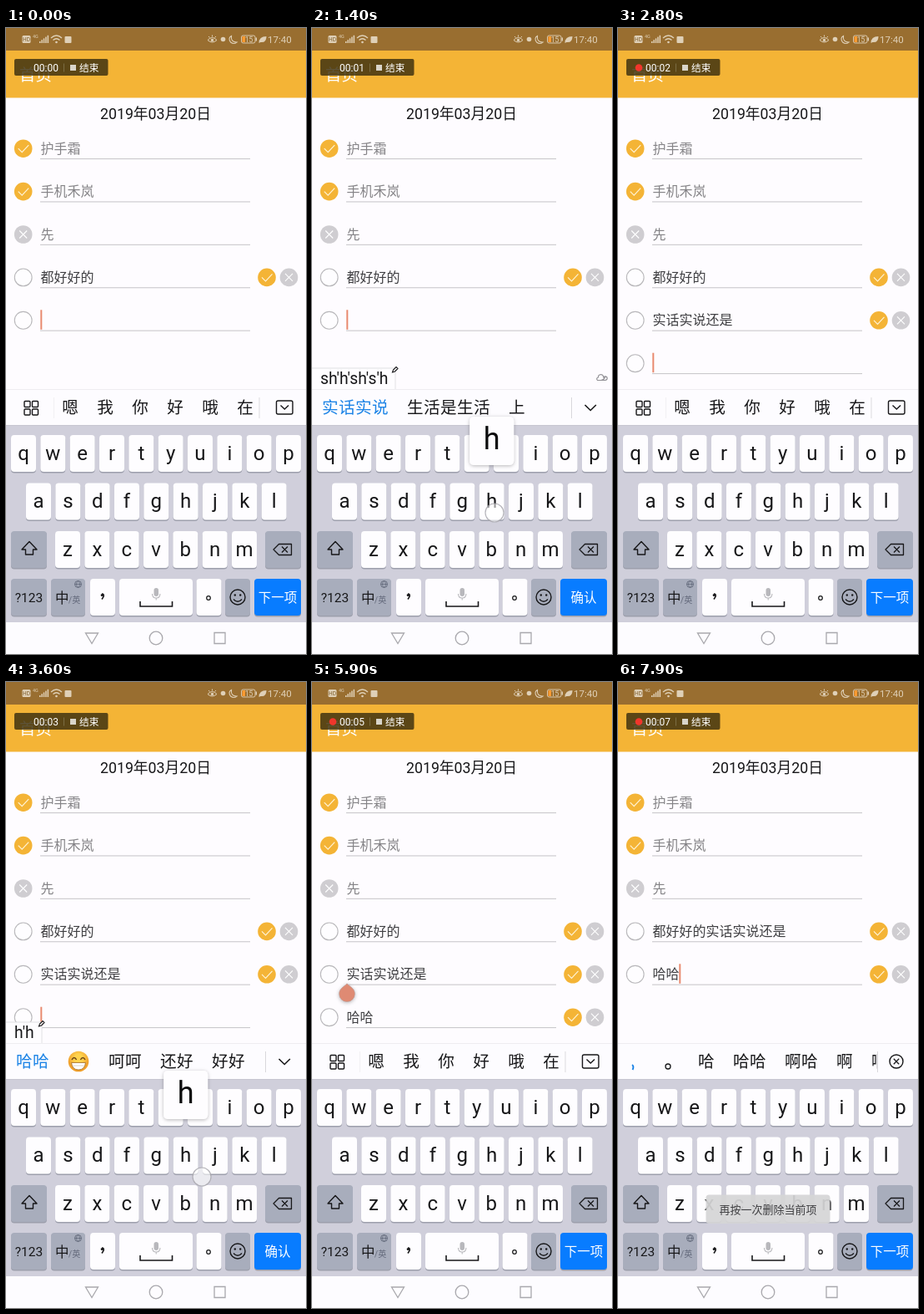
Write an HTML page that moves like this. It is 360 px wide and 749 px high and loops after 8 s.

```html
<!DOCTYPE html>
<html lang="zh-CN">
<head>
<meta charset="utf-8">
<title>待办输入</title>
<style>
html, body { margin: 0; width: 100%; height: 100%; overflow: hidden; background: #fefcff; }
svg { display: block; width: 360px; height: 749px; }
text { font-family: Roboto, "Noto Sans CJK SC", "Noto Sans CJK", sans-serif; white-space: pre; }
</style>
</head>
<body>
<svg id="stage" viewBox="0 0 360 749">
  <defs>
    <clipPath id="bar"><rect y="432" width="310.5" height="43"/></clipPath>
    <filter id="soft" x="-30%" y="-30%" width="160%" height="160%">
      <feDropShadow dx="0" dy="1" stdDeviation="2" flood-opacity=".28"/>
    </filter>
    <radialGradient id="face" cy=".35"><stop offset=".4" stop-color="#ffd34f"/><stop offset="1" stop-color="#f0a02c"/></radialGradient>
  </defs>
  <g id="header"></g>
  <g id="list"></g>
  <g id="candidates"></g>
  <g id="keyboard"></g>
  <g id="overlay"></g>
</svg>
<script>
const LOOP = 8000;
const ORANGE = '#f4b436', INK = '#171719', CORAL = '#e98b70';
const $ = id => document.getElementById(id);

// SVG string helpers
const rect = (x, y, w, h, fill, r = 0, more = '') =>
  `<rect x="${x}" y="${y}" width="${w}" height="${h}" rx="${r}" fill="${fill}" ${more}/>`;
const circle = (x, y, r, fill, more = '') => `<circle cx="${x}" cy="${y}" r="${r}" fill="${fill}" ${more}/>`;
const line = (d, color, w = 1, more = '') =>
  `<path d="${d}" fill="none" stroke="${color}" stroke-width="${w}" ${more}/>`;
const text = (x, y, s, size, fill = INK, anchor = 'start', more = '') =>
  `<text x="${x}" y="${y}" font-size="${size}" fill="${fill}" text-anchor="${anchor}" ${more}>${s}</text>`;
const mid = (x, y, s, size, fill) => text(x, y, s, size, fill, 'middle');

const cache = {};
function put(id, html) {
  if (cache[id] !== html) $(id).innerHTML = cache[id] = html;
}

const pen = document.createElement('canvas').getContext('2d');
function widthOf(s, size) {
  pen.font = `${size}px Roboto, sans-serif`;
  return pen.measureText(s).width;
}

// Keyboard layout
const keys = {};
function addRow(letters, x0, y) {
  [...letters].forEach((c, i) => keys[c] = { x: x0 + i * 35.33 - 15, y, w: 30, h: 44.5 });
}
addRow('qwertyuiop', 21, 487);
addRow('asdfghjkl', 39, 544.5);
addRow('zxcvbnm', 74, 602);
Object.assign(keys, {
  shift: { x: 6, y: 602, w: 43, h: 44.5, dark: 1 },
  del: { x: 311, y: 602, w: 43, h: 44.5, dark: 1 },
  num: { x: 6, y: 659, w: 43, h: 44.5, dark: 1 },
  lang: { x: 54, y: 659, w: 41, h: 44.5, dark: 1 },
  comma: { x: 101, y: 659, w: 30, h: 44.5 },
  space: { x: 136, y: 659, w: 88, h: 44.5 },
  stop: { x: 228.5, y: 659, w: 30, h: 44.5 },
  smile: { x: 263, y: 659, w: 30, h: 44.5, dark: 1 },
  enter: { x: 298, y: 659, w: 56, h: 44.5, blue: 1 }
});

function keyboard(composing, pressed) {
  let s = rect(0, 475, 360, 236, '#d0cfdb') + rect(0, 475, 360, 1, '#c6c5d0') + rect(0, 711, 360, 38, '#fdfcff');
  for (const name in keys) {
    const k = keys[name];
    let fill = k.blue ? '#087cff' : k.dark ? '#a8adbc' : '#fefdff';
    if (pressed.includes(name)) fill = k.blue ? '#0668d8' : k.dark ? '#969cac' : '#b3bac9';
    s += rect(k.x, k.y + 1, k.w, k.h, '#9d9fac', 4) + rect(k.x, k.y, k.w, k.h - .5, fill, 4);
    if (name.length === 1) s += mid(k.x + 15, k.y + 29.5, name, 24, INK);
  }
  s += line('M28 614.5l9 9.5h-4.5v6h-9v-6H19z', INK, 1.4, 'stroke-linejoin="round"');
  s += line('M321 624l6.5-6.5h15v13h-15zM331 620.5l7 7m0-7l-7 7', INK, 1.3, 'stroke-linejoin="round"');
  s += mid(27.5, 687, '?123', 15.5, INK);
  s += text(59, 687.5, '中', 16.5) + text(75, 688, '/英', 10, '#62687a');
  s += circle(86.5, 665.5, 4, 'none', 'stroke="#596072" stroke-width=".8"');
  s += line('M82.5 665.5h8M86.5 661.5q-4 4 0 8q4-4 0-8', '#596072', .7);
  s += line('M115 677q3 0 2 3.5l-2 3', INK, 1.6) + circle(115.3, 678.5, 1.6, INK);
  s += rect(177.5, 670, 5.5, 10, '#b8b8bc', 2.75) + line('M175.5 677q0 5 4.7 5t4.7-5M180.2 682v2.5', '#b8b8bc', 1.1);
  s += line('M161 686v6h38.500v-6', INK, 1.6);
  s += circle(243, 682, 2.3, 'none', `stroke="${INK}" stroke-width="1.2"`);
  s += circle(278, 681, 9, 'none', `stroke="${INK}" stroke-width="1.4"`);
  s += circle(274.8, 678.5, 1.2, INK) + circle(281.2, 678.5, 1.2, INK) + line('M273 683.500q5 5.500 10 0', INK, 1.3);
  s += mid(326, 687, composing ? '确认' : '下一项', 15.5, '#fff');
  s += line('M95.500 724h15l-7.500 12.500z', '#a9a8ad', 1.3) + circle(180, 730, 7.8, 'none', 'stroke="#a9a8ad" stroke-width="1.3"');
  return s + line('M250 723.500h13v13h-13z', '#a9a8ad', 1.3);
}

function header(t) {
  const pale = '#dfd0b7';
  const sec = Math.max(0, Math.floor((t - 300) / 1000));
  const dot = t > 300 && (t + 700) % 1000 >= 500;
  let s = rect(0, 0, 360, 27.5, '#996e30') + rect(0, 27, 360, 56.5, ORANGE);
  s += rect(19.5, 9, 10, 9, pale, 1.5) + mid(24.5, 16.300, 'HD', 6.5, '#80602f');
  s += text(32, 12, '4G', 5.500, pale);
  for (let i = 0; i < 5; i++) s += rect(40 + i * 2.4, 16 - i * 1.8, 1.5, 2 + i * 1.8, pale);
  s += line('M54 12q6.500-6 13 0M56.500 14.500q4-3.500 8 0', pale, 1.3) + circle(60.500, 17, 1.3, pale);
  s += rect(70.500, 10, 8, 8, pale, 1);
  s += line('M242 14.500q5.500-6 11 0q-5.500 5-11 0M243 10l1.500 1.500M247.500 8.500v2M252 10l-1.500 1.500', pale, 1) + circle(247.500, 14.500, 1.700, pale);
  s += circle(260.500, 13.500, 2.800, pale);
  s += line('M270.500 9.500q-1 7.500 6.500 7.500q-3.500 3-7.500 0q-3.500-5 1-7.500z', pale, 1.1);
  s += rect(282.500, 9, 16.500, 9, 'none', 2, `stroke="${pale}" stroke-width=".9"`) + rect(283.500, 10, 3.500, 7, '#f99a30') + rect(299.500, 11.500, 1.500, 4, pale);
  s += mid(291.500, 16.700, '15', 8.500, pale);
  s += `<path d="M303.500 18q0-8 9-8q0 8-7 7z" fill="${pale}"/>`;
  s += text(314, 17.800, '17:40', 11.500, pale);
  s += text(16, 63, '首页', 19.500, '#fff', 'start', 'font-weight="500"');
  s += rect(10, 37, 112.500, 20, '#3f3110', 2, 'fill-opacity=".84"');
  if (dot) s += circle(25, 47.500, 4.300, '#f1362b');
  s += text(33, 51.800, `00:0${sec}`, 12, '#fff') + rect(69, 42.500, .8, 10, '#82764f');
  s += rect(77, 44, 7, 7, '#d9d5ca') + text(88, 51.800, '结束', 11.700, '#fff');
  return s + mid(179.500, 108.500, '2019年03月20日', 17.750, INK);
}

// List of tasks
const tick = (x, y) => circle(x, y, 10.8, ORANGE) + line(`M${x - 6} ${y}l4.500 4.500l8-8.500`, '#fff3d5', 1.2);
const cross = (x, y) => circle(x, y, 10.8, '#cfcdd1') + line(`M${x - 4.500} ${y - 4.500}l9 9m0-9l-9 9`, '#fff', 1.1);
const done = ['护手霜', '手机禾岚', '先'];

function list(st, cursorOn) {
  let s = '';
  [...done, ...st.rows].forEach((label, i) => {
    const y = 144.200 + i * 51.400, open = i >= 3;
    s += !open ? (i < 2 ? tick : cross)(20.700, y) : circle(20.700, y, 10.400, '#fefdff', 'stroke="#b9b8bb" stroke-width="1.1"');
    s += rect(41, y + 11.800, 252, 1.100, '#cac9cc') + text(41.500, y + 5.500, label, 16, open ? '#3f3f42' : '#858487');
    if (open && label) s += tick(313, y) + cross(339.500, y);
  });
  const y = 298.400 + st.focus * 51.400, x = 42 + st.pos * 16;
  if (cursorOn) s += rect(x - .7, y - 12.500, 2, 23.500, CORAL);
  if (st.handle) s += `<path d="M42 ${y + 11}c4 4 9.500 6 9.500 12.500a9.500 9.500 0 0 1-19 0c0-6.500 5.500-8.500 9.500-12.500z" fill="#df8a73" stroke="#aaa2a4" stroke-opacity=".5" filter="url(#soft)"/>`;
  return s;
}

// Suggestion bar
const grin = (x, y) => circle(x, y, 12.300, 'url(#face)') +
  line(`M${x - 8} ${y - 2}q2.800-5 5.600 0M${x + 2.400} ${y - 2}q2.800-5 5.600 0`, '#6c4415', 1.500) +
  `<path d="M${x - 8.500} ${y + 1.500}h17q-1 8.500-8.500 8.500t-8.500-8.500z" fill="#fff" stroke="#a06a28" stroke-width=".8"/>` +
  line(`M${x - 7.500} ${y + 5}h15`, '#c9b9a0', .6);
const loopGlyph = x => line(`M${x + 1} 450q4 1.500 8-1.500M${x + 5} 450q-5 1-4.500 5q1 4 4.500.500q3.500 3.500 4.500-.500q0-4-3-4.500`, INK, 1.200);

function word(x, s, blue) {
  const color = blue ? '#1b83e6' : INK;
  if (s === '☺') return grin(x + 13, 454);
  if (s === '。') return circle(x + 6, 460, 3, 'none', `stroke="${color}" stroke-width="1.300"`);
  if (s === '，') return line(`M${x + 5} 458q2.500 2 .500 6`, color, 1.900);
  return text(x, 461, s, 19.600, color, 'start', `textLength="" letter-spacing=".4"`.replace('textLength="" ', ''));
}

function candidates(st, comp) {
  let s = '';
  if (comp) {
    const w = Math.round(widthOf(comp.text, 19.300)) + 19;
    s += rect(-1, 407, w + 1, 26, '#fefdff', 0, 'stroke="#e2e1e4"') + text(10, 426, comp.text, 19.300);
    s += line(`M${w - 3.500} 412l1-3l3.500-3.500l2 2l-3.500 3.500z`, INK, 1.100);
    if (comp.cloud) s += line('M344 421.500h8q3-1 2-3.500q-2-2-4 0q-1-4.500-5-3q-2 1-1.500 3q-3 1-1 3.500h4q4-.500 5-3.500', '#929196', 1.200);
  }
  s += rect(0, 432, 360, 43, '#fdfcff') + rect(0, 432, 360, .8, '#ebeaee');
  const mode = comp ? 'comp' : st.mode;
  if (mode === 'home') {
    for (const x of [22, 31.500]) for (const y of [446.500, 456])
      s += rect(x, y, 7, 7, 'none', 1, `stroke="${INK}" stroke-width="1.400"`);
    s += rect(57, 442, .8, 25, '#eeedf0') + rect(303.500, 442, 1, 25, '#dddce0');
    [...'嗯我你好哦在'].forEach((c, i) => s += mid(77 + i * 42, 461, c, 19.600, INK));
    return s + rect(324.500, 446, 19.500, 16, 'none', 2, `stroke="${INK}" stroke-width="1.400"`) + line('M329.500 451.500l4.800 4.500l4.800-4.500', INK, 1.400);
  }
  if (mode === 'fun') {
    s += grin(25, 454) + text(62, 459, '(', 14) + loopGlyph(67) + text(78, 459, 'ω', 14) + loopGlyph(89) + text(99, 459, ')', 14) + text(103, 459, 'hiahiahia', 14);
    s += line('M171 455q0 6 5 6h26q5 0 5-6v-6', '#dddce0', 1) + text(176.500, 456.500, '更多', 13);
    s += word(243.500, '。') + word(284.500, '，');
  } else {
    let x = 12, row = '';
    (comp ? comp.words : st.words).split(' ').forEach((v, i) => {
      row += word(x, v, i === 0);
      x += v === '☺' ? 49 : v.length * 20 + 22;
    });
    s += `<g clip-path="url(#bar)">${row}</g>`;
  }
  s += rect(311, 442, 1, 25, '#d9d8dc');
  if (mode === 'comp') return s + line('M327.500 451l6.700 6.500l6.700-6.500', INK, 1.600);
  return s + circle(334, 454, 8, 'none', `stroke="${INK}" stroke-width="1.400"`) + line('M330.800 450.800l6.400 6.400m0-6.400l-6.400 6.400', INK, 1.300);
}

// Timeline
const first = '都好好的', second = '实话实说还是';
const states = [
  { at: 0, rows: [first, ''], focus: 1, pos: 0, mode: 'home' },
  { at: 1750, rows: [first, second], focus: 1, pos: 6, mode: 'next', words: '。 不是 个 谁 因为 的 吗' },
  { at: 2500, rows: [first, second, ''], focus: 2, pos: 0, mode: 'home' },
  { at: 4000, rows: [first, second, '哈哈'], focus: 2, pos: 2, mode: 'fun' },
  { at: 4700, rows: [first, second, '哈哈'], focus: 1, pos: 0, mode: 'home' },
  { at: 5250, rows: [first, second, '哈哈'], focus: 1, pos: 0, mode: 'home', handle: 1 },
  { at: 6200, rows: [first, second, '哈哈'], focus: 1, pos: 0, mode: 'home' },
  { at: 6700, rows: [first + second, '哈哈'], focus: 1, pos: 2, mode: 'next', words: '， 。 哈 哈哈 啊哈 啊 啊' }
];
const compose = [
  [370, 's', '是 时 说 上 谁 sh'],
  [520, 'sh', '是 时候 上 说 谁 水'],
  [720, "sh'h", '上海 社会 适合 生活 说话'],
  [920, "sh'h's", '上海市 是好事 生活还是 社会', 1],
  [1050, "sh'h'sh", '上海市 实话实 是好事 社会', 1],
  [1220, "sh'h'sh's", '实话实说 生活十分 上海', 1],
  [1340, "sh'h'sh's'h", '实话实说 生活是生活 上', 1],
  [1490, "sh'h'sh's'h's", '实话实说还是 生活 上海', 1],
  [1750],
  [3270, 'h', '好 和 还 会 后 哈 很'],
  [3540, "h'h", '哈哈 ☺ 呵呵 还好 好好'],
  [4000]
].map(([at, s, words, cloud]) => ({ at, text: s, words, cloud }));

// Each tap: time, touch point, key if any
const taps = [
  [300, 78, 571, 's'], [450, 220, 578, 'h'], [650, 219, 580, 'h'], [850, 80, 570, 's'],
  [980, 220, 581, 'h'], [1150, 79, 572, 's'], [1270, 219, 580, 'h'], [1420, 80, 571, 's'],
  [1660, 68, 456], [2420, 324, 684, 'enter'], [3200, 222, 584, 'h'], [3470, 235, 592, 'h'],
  [3910, 34, 457], [4550, 51, 364], [5170, 46, 358], [6130, 333, 626, 'del'], [6630, 333, 626, 'del']
];
const latest = (items, t) => items.filter(o => o.at <= t).pop();

function overlay(t, live) {
  let s = '';
  for (const [at, , , name] of live) {
    if (!name || name.length > 1 || t - at >= 145) continue;
    const k = keys[name], x = k.x + 15;
    s += rect(x - 26.500, 465, 53, 58, '#fefdff', 5, `filter="url(#soft)" transform="translate(0 ${k.y - 544.500})"`) + mid(x, k.y - 41, name, 36, '#0b0b0c');
  }
  if (t >= 6200) s += rect(105.500, 613.500, 149, 34.500, '#d6d5d7', 4, 'fill-opacity=".93"') + mid(180, 635.500, '再按一次删除当前项', 13, '#3e3e41');
  for (const [at, x, y] of live) {
    const age = t - at, fade = age < 110 ? 1 : 1 - (age - 110) / 140;
    s += `<g opacity="${fade.toFixed(2)}">` + circle(x, y, 11, '#fff', 'fill-opacity=".68" stroke="#aaa9af" stroke-width="1.200"') + '</g>';
  }
  return s;
}

function draw(t) {
  const st = latest(states, t);
  const step = latest(compose, t);
  const comp = step && step.text ? step : null;
  const live = taps.filter(([at]) => t >= at && t < at + 250);
  const pressed = live.filter(([at, , , name]) => name && t - at < 110).map(tap => tap[3]);
  put('header', header(t));
  put('list', list(st, (t - st.at) % 1000 < 500));
  put('candidates', candidates(st, comp));
  put('keyboard', keyboard(comp, pressed));
  put('overlay', overlay(t, live));
}

const start = performance.now();
function frame() {
  draw((performance.now() - start) % LOOP);
  requestAnimationFrame(frame);
}
frame();
</script>
</body>
</html>
```
